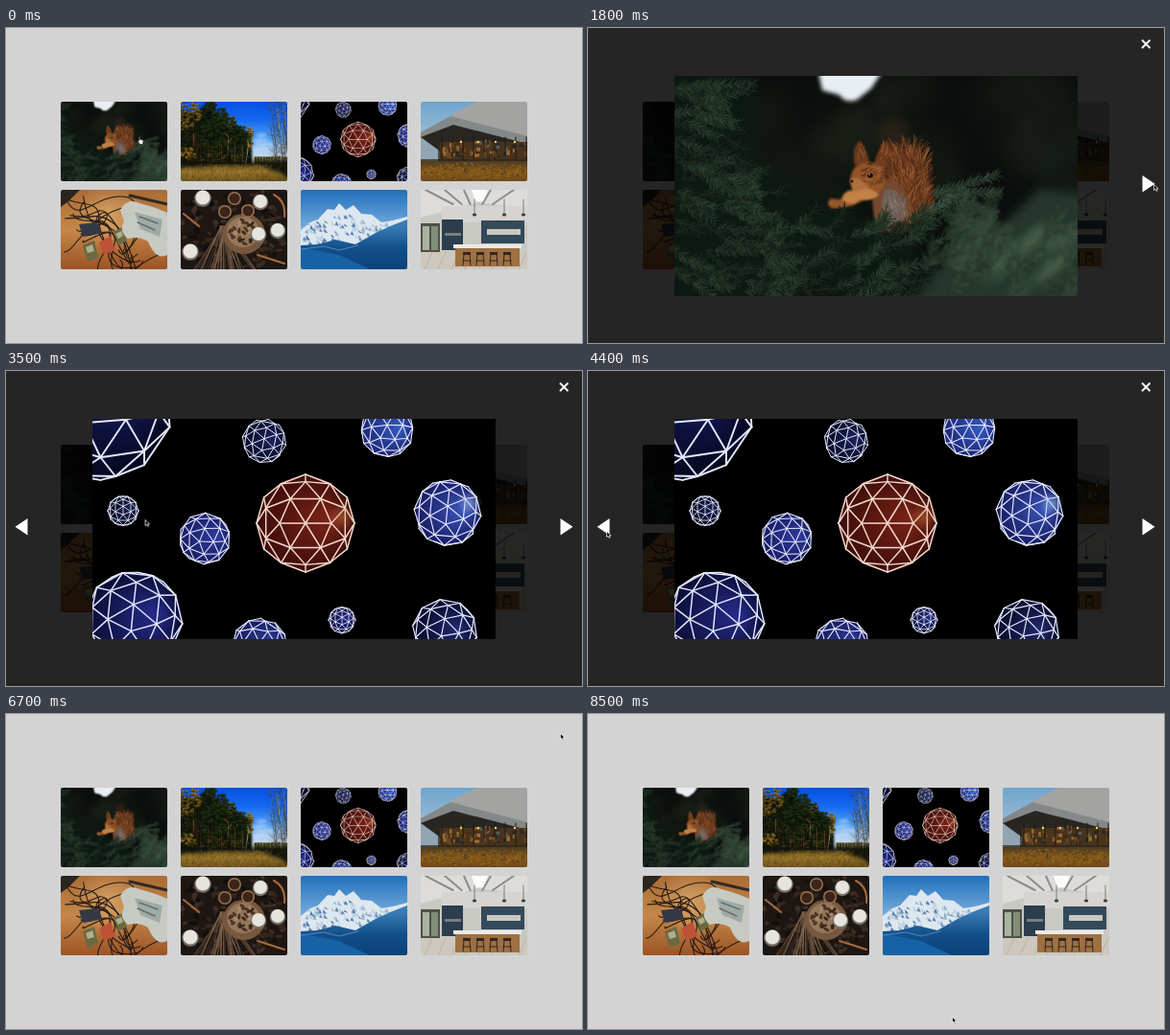
An HTML page with a canvas for the animation above (8.6 s loop, 600 px wide and 329 px high).

```html
<!DOCTYPE html>
<html lang="en">
<head>
<meta charset="utf-8">
<title>Gallery with lightbox</title>
<style>
  html, body { margin: 0; width: 100%; height: 100%; overflow: hidden; background: #d3d3d3; }
  #stage { position: relative; width: 600px; height: 329px; overflow: hidden; background: #d3d3d3; }
  #stage * { position: absolute; }
  #thumbs canvas { border-radius: 2px; }
  #box { inset: 0; background: rgba(0, 0, 0, .825); animation: box 8.6s linear infinite; }
  #box canvas { left: 90px; top: 49.5px; }
  #ui, #pointer { left: 0; top: 0; overflow: visible; }
  #two { animation: two 8.6s step-end infinite; }
  #three { animation: three 8.6s step-end infinite; }
  #prev { animation: prev 8.6s step-end infinite; }
  #pointer { animation: move 8.6s ease-in-out infinite; }
  #hand { animation: hand 8.6s step-end infinite; }
  #arrow { animation: arrow 8.6s step-end infinite; }

  @keyframes box { 0%, 3.49% { opacity: 0 } 6.4%, 74.42% { opacity: 1 } 77.33%, 100% { opacity: 0 } }
  @keyframes two { 0% { opacity: 0 } 21.51% { opacity: 1 } 31.98% { opacity: 0 } 52.33% { opacity: 1 } 61.05%, 100% { opacity: 0 } }
  @keyframes three { 0% { opacity: 0 } 31.98% { opacity: 1 } 52.33%, 100% { opacity: 0 } }
  @keyframes prev { 0% { opacity: 0 } 21.51% { opacity: 1 } 61.05%, 100% { opacity: 0 } }
  @keyframes hand { 0% { opacity: 1 } 4.65%, 100% { opacity: 0 } }
  @keyframes arrow { 0% { opacity: 0 } 4.65%, 100% { opacity: 1 } }
  @keyframes move {
    0%, 10.47% { transform: translate(137px, 113px) }
    18.6%, 34.88% { transform: translate(589px, 163px); animation-timing-function: ease-in }
    40.7% { transform: translate(145px, 155px); animation-timing-function: ease-out }
    44.77%, 61.28% { transform: translate(19px, 167px); animation-timing-function: ease-in }
    63.95% { transform: translate(515px, 36px); animation-timing-function: ease-out }
    67.44%, 79.07% { transform: translate(577px, 20px); animation-timing-function: ease-in }
    84.88% { transform: translate(500px, 110px); animation-timing-function: ease-out }
    93.6%, 100% { transform: translate(379px, 316px) }
  }
</style>
</head>
<body>
<div id="stage">
  <div id="thumbs"></div>
  <div id="box">
    <canvas id="one"></canvas>
    <canvas id="two"></canvas>
    <canvas id="three"></canvas>
    <svg id="ui" width="600" height="329" fill="#fff">
      <path d="M577 12.5l8.5 8.5m0-8.5l-8.5 8.5" stroke="#fff" stroke-width="1.9"/>
      <path d="M577.5 154l13 8.7-13 8.8z"/>
      <path id="prev" d="M22.5 154l-13 8.7 13 8.8z"/>
    </svg>
  </div>
  <svg id="pointer" width="10" height="12" stroke="#fff" stroke-width=".7">
    <path id="arrow" d="M.5.3v6.2l1.5-1.3 1 2.2 1.1-.5-1-2.1h1.9z" fill="#000"/>
    <path id="hand" d="M1.5.5q.8-.4 1 .6v2.2l2.9.8q.8.3.6 1.5l-.5 2.9h-3l-2.2-3.2q-.2-.9.7-.6l.5.4z" fill="#fff" stroke="#222"/>
  </svg>
</div>
<script>
let g, seed = 7;
const TAU = Math.PI * 2;

function rnd(a = 0, b = 1) {
  seed = (seed * 1664525 + 1013904223) >>> 0;
  return a + (b - a) * seed / 4294967296;
}
const pick = list => list[Math.floor(rnd() * list.length)];

function paint(canvas, w, h, draw) {
  canvas.width = w;
  canvas.height = h;
  g = canvas.getContext('2d');
  g.imageSmoothingQuality = 'high';
  g.lineCap = g.lineJoin = 'round';
  draw();
  return canvas;
}
function fill(color, d) {
  g.fillStyle = color;
  g.fill(new Path2D(d));
}
function stroke(color, width, d) {
  g.strokeStyle = color;
  g.lineWidth = width;
  g.stroke(new Path2D(d));
}
const line = (color, width, a, b, c, d) => stroke(color, width, `M${a} ${b}L${c} ${d}`);
function rect(color, x, y, w, h) {
  g.fillStyle = color;
  g.fillRect(x, y, w, h);
}
function oval(color, x, y, rx, ry = rx, turn = 0) {
  g.fillStyle = color;
  g.beginPath();
  g.ellipse(x, y, rx, ry, turn, 0, TAU);
  g.fill();
}
function blur(px, draw) {
  g.filter = `blur(${px}px)`;
  draw();
  g.filter = 'none';
}
function fade(y0, y1, ...colors) {
  const f = g.createLinearGradient(0, y0, 0, y1);
  colors.forEach((c, i) => f.addColorStop(i / (colors.length - 1), c));
  return f;
}
function glow(color, x, y, r) {
  const f = g.createRadialGradient(x, y, 0, x, y, r);
  f.addColorStop(0, color);
  f.addColorStop(1, color.slice(0, 7) + '00');
  oval(f, x, y, r);
}
// Calls draw at n random places inside an ellipse
function scatter(n, x, y, rx, ry, draw) {
  while (n--) {
    const a = rnd(0, TAU), r = Math.sqrt(rnd());
    draw(x + Math.cos(a) * r * rx, y + Math.sin(a) * r * ry);
  }
}
const leaves = (n, colors, x, y, rx, ry, size) => scatter(n, x, y, rx, ry, (px, py) =>
  oval(pick(colors), px, py, rnd(.5, 1) * size, rnd(.3, .7) * size, rnd(-1, 1)));
// Tufts of foliage with a shaded underside and a lit top
const tufts = (n, dark, lit, x, y, rx, ry, size = 6) => scatter(n, x, y, rx, ry, (px, py) => {
  leaves(12, dark, px, py + size * .35, size, size * .5, 1.8);
  leaves(11, lit, px, py - size * .2, size, size * .45, 1.4);
});
function sprig(x, y, angle, len, colors, needle = 8) {
  for (let t = 0; t < len; t += 1.3) {
    const px = x + Math.cos(angle) * t, py = y + Math.sin(angle) * t;
    for (const side of [-1, 1]) {
      const a = angle + side * rnd(.4, 1.1), l = needle * rnd(.6, 1.1);
      line(pick(colors), .7, px, py, px + Math.cos(a) * l, py + Math.sin(a) * l);
    }
  }
  line('#2d2a20', .8, x, y, x + Math.cos(angle) * len, y + Math.sin(angle) * len);
}
// Short hairs around one direction
const fur = (n, colors, x, y, rx, ry, angle, len) => scatter(n, x, y, rx, ry, (px, py) => {
  const a = angle + rnd(-.5, .5), l = len * rnd(.5, 1);
  line(pick(colors), .6, px, py, px + Math.cos(a) * l, py + Math.sin(a) * l);
});

function squirrel() {
  rect('#0b0e0c', 0, 0, 420, 230);
  for (let i = 0; i < 30; i++) glow(pick(['#1a231a80', '#1d231880', '#12171280']), rnd(70, 420), rnd(0, 140), rnd(20, 55));
  blur(2, () => fill('#e9eef3', 'M150-4H216L205 13 190 25Q178 29 172 20L154 15Z'));
  glow('#4a2c1c70', 228, 60, 24);
  blur(6, () => fill('#0e1812', 'M-10-10H75L90 90 160 140 250 160 260 240H-10Z'));
  const deep = ['#121e17', '#18281d', '#1f3025', '#0d1611'], lit = ['#263c2c', '#33493a', '#1c3023', '#15231a'];
  for (let i = 0; i < 120; i++) {
    const y = rnd(10, 235);
    sprig(rnd(-12, 25 + y * .4), y, rnd(-.3, .7), rnd(20, 42), i < 65 ? deep : lit);
  }
  sprig(0, 12, -.05, 82, lit);
  sprig(20, 32, -.3, 60, lit);

  const rust = ['#7a4220', '#94552c', '#57301b', '#a86738', '#3f2315'];
  blur(3, () => fill('#5a3019', 'M236 155Q208 104 222 72Q248 66 262 98Q277 130 266 149Z'));
  fur(420, rust, 250, 112, 15, 38, -1.1, 16);
  fur(240, rust, 238, 98, 14, 26, -1.9, 14);
  blur(.8, () => {
    fill('#74492f', 'M208 108Q236 105 246 132Q255 154 238 164H213Q203 140 208 108Z');
    fill('#6f6058', 'M219 118Q235 118 241 136Q238 156 224 160Q211 144 219 118Z');
    fill('#6d3b1e', 'M188 94Q184 74 193 69Q201 76 203 91ZM208 92Q212 74 222 68Q227 80 219 100Z');
    fill('#935428', 'M183 109Q184 92 201 90Q219 91 220 108Q218 123 203 127Q187 126 183 109Z');
    fill('#ad713f', 'M183 109Q190 103 198 112L207 121Q194 127 186 121Z');
    fill('#96572b', 'M206 124Q185 140 163 138Q157 132 163 128Q178 132 193 121Z');
    fill('#c28246', 'M174 129Q177 117 190 120Q205 115 213 124Q206 132 193 129Q185 138 174 129Z');
  });
  fur(110, rust, 205, 103, 13, 12, -.3, 5);
  fur(90, ['#85766d', '#5b4c45', '#7a5138', '#99887c'], 230, 137, 12, 20, 1.3, 7);
  fur(40, rust, 193, 80, 4, 9, -1.7, 6);
  fur(40, rust, 217, 81, 5, 10, -1.3, 6);
  oval('#170e09', 204, 104, 3, 2.6);
  oval('#fff', 203, 103, .7);
  oval('#2b1911', 185, 110, 1.6);

  for (let i = 0; i < 75; i++) sprig(rnd(80, 245), rnd(158, 240), rnd(-1, .3), rnd(18, 36), i < 40 ? deep : lit);
  for (let i = 0; i < 16; i++) sprig(rnd(235, 310), rnd(140, 180), rnd(-.9, .1), rnd(18, 36), lit);
  sprig(262, 142, -.5, 45, ['#405c47', '#2b4233', '#536c55']);
  for (const y of [104, 112, 122]) sprig(270, 122, (y - 112) / 30, 70, ['#30483a', '#3d5645', '#263a2c']);
  blur(5, () => {
    fill('#25372c', 'M245 240L290 185 340 158 380 118 430 125V240Z');
    for (let i = 0; i < 14; i++) oval(pick(['#3d5343', '#465c49', '#304538']), rnd(300, 420), rnd(160, 225), 22, 8, -.8);
  });
  blur(1.5, () => {
    for (let i = 0; i < 26; i++) sprig(rnd(260, 410), rnd(150, 240), rnd(-1.5, -.1), 32, ['#4a604e', '#3a5040', '#2a3c30'], 11);
  });
}

function forest() {
  rect(fade(0, 160, '#0650e4', '#166af0', '#4f9ff3', '#cfe2f2'), 0, 0, 420, 230);
  blur(4, () => {
    for (const [x, y, w] of [[290, 97, 16], [285, 112, 22], [298, 124, 30], [285, 138, 34]]) oval('#e3eefaa0', x, y, w, 4, -.1);
  });
  const shade = ['#0a1108', '#111a0b', '#1a230e'],
    pine = ['#223414', '#304319', '#3f4f1f', '#182610'],
    gold = ['#a87416', '#c08c24', '#8a6314', '#cf9f3a'],
    dusk = ['#4a3a10', '#6b4f14', '#2b260e'];
  blur(3, () => fill('#0d120a', 'M-9 20L100 30 125 10 170 40 205 65 232 78 258 90 264 185H-9Z'));
  tufts(120, dusk, gold, 50, 30, 64, 52);
  tufts(90, shade, pine.concat(dusk), 45, 108, 70, 48);
  for (let x = 4; x < 110; x += 8) line('#2e2917', .8, x, rnd(10, 60), x + rnd(-4, 4), 180);
  tufts(36, shade, gold.concat(pine), 203, 62, 13, 20, 5);
  tufts(34, dusk, gold, 256, 102, 9, 30, 4);
  tufts(100, shade, pine, 222, 118, 36, 54);
  tufts(130, shade, pine, 148, 92, 38, 82);
  tufts(34, shade, pine, 143, 12, 15, 14, 5);
  tufts(50, shade, pine, 176, 44, 18, 26);
  tufts(28, dusk, gold, 76, 153, 22, 20, 5);
  tufts(50, shade, ['#5a4a16', '#3a3a16', '#7a5a1a'], 165, 165, 95, 14, 5);
  for (let i = 0; i < 15; i++) line(pick(['#7d4526', '#4f301c', '#2a1d12']), 1.2, 92 + i * 11, rnd(110, 140), 92 + i * 11, 182);
  stroke('#a85c32', 1.4, 'M193 145V102L181 88M193 118L203 104M93 92L94 130M175 125V180');
  tufts(60, shade, pine, 172, 100, 60, 60, 5);
  stroke('#cfc8b0', 1.2, 'M242 180Q252 150 250 110M270 178L267 148');

  blur(1, () => rect('#2c3018', 268, 159, 162, 24));
  leaves(320, ['#5f5220', '#2a3018', '#8a6f2c', '#9c8640'], 345, 167, 80, 9, 1.8);
  for (let i = 0; i < 20; i++) {
    const x = 270 + i * 7.5;
    line('#c9c8b8', rnd(.4, 1), x, 178, x + rnd(-4, 4), rnd(122, 158));
  }
  // Birches: leaning trunks, fine twigs, sparse leaves
  const bark = ['#c4c3bb', '#4b4540', '#8a8680', '#2c2a2a'], twig = ['#3a302a', '#2b2a33', '#5a4a3c'];
  for (let i = 0; i < 30; i++) {
    const x = rnd(328, 428), top = rnd(0, 90), lean = rnd(8, 24);
    line(pick(bark), rnd(.6, 1.6), x, 192, x - lean, top);
    for (let j = 0; j < 26; j++) {
      const t = rnd(), bx = x - lean * t, by = 192 - (192 - top) * t, dx = rnd(-24, 20);
      line(pick(twig), .45, bx, by, bx + dx, by - rnd(4, 22));
    }
  }
  const dry = ['#4f3a28', '#2c2830', '#7d5f2c', '#1f2024', '#94742f'];
  leaves(1100, dry, 385, 72, 72, 90, 1.3);
  leaves(420, dry, 368, 14, 66, 26, 1.4);
  leaves(420, dry, 398, 135, 44, 50, 1.4);

  rect(fade(176, 230, '#5a4d1c', '#937028', '#6a521b'), 0, 180, 420, 50);
  blur(5, () => fill('#12130a', 'M-9 170H130L150 186 60 190 30 205-9 215ZM262 172H430V240H395L345 206 300 190ZM120 176H275V184H120Z'));
  const straw = ['#b88f3c', '#7b621f', '#463c16', '#96722a', '#c7a24f', '#30290f'];
  for (let y = 184; y < 238; y += .04) {
    const x = rnd(0, 420), dark = x > 270 + (238 - y) || x < 90 - (y - 184) * 2.5;
    line(pick(dark ? ['#2e2a10', '#4d4219', '#17170b', '#7a6226'] : straw), .6, x, y, x + rnd(-3, 3), y - rnd(2, 7));
  }
}

// Two-frequency icosahedral sphere: twelve corners plus the edge midpoints
const PHI = (1 + Math.sqrt(5)) / 2;
const unit = v => v.map(n => n / Math.hypot(...v));
const dist = (a, b) => Math.hypot(a[0] - b[0], a[1] - b[1], a[2] - b[2]);
function pairs(points, max) {
  const out = [];
  points.forEach((a, i) => points.slice(i + 1).forEach(b => dist(a, b) < max && out.push([a, b])));
  return out;
}
const corners = [];
for (const s of [-1, 1]) for (const t of [-PHI, PHI]) corners.push([0, s, t], [s, t, 0], [t, 0, s]);
const base = corners.map(unit);
const mids = pairs(base, 1.1).map(([a, b]) => unit(a.map((n, i) => n + b[i])));
const struts = pairs(base.concat(mids), .7);

function ball(x, y, r, dark, light, turn, tilt, edge = '#e4e8ff') {
  const f = g.createRadialGradient(x + r * .5, y - r * .1, 0, x, y, r);
  f.addColorStop(0, light);
  f.addColorStop(1, dark);
  oval(f, x, y, r * .96);
  const spin = ([a, b, c]) => {
    const p = a * Math.cos(turn) - b * Math.sin(turn), q = a * Math.sin(turn) + b * Math.cos(turn);
    return [x + r * p, y + r * (q * Math.cos(tilt) - c * Math.sin(tilt)), q * Math.sin(tilt) + c * Math.cos(tilt)];
  };
  for (const [a, b] of struts) {
    const p = spin(a), q = spin(b);
    if (p[2] + q[2] > -.15) line(edge, .6 + r / 60, p[0], p[1], q[0], q[1]);
  }
}
function spheres() {
  rect('#000', 0, 0, 420, 230);
  const navy = '#0a0c30', blue = '#252c8c';
  ball(4, -14, 80, '#05061a', '#151958', .3, .3);
  ball(179, 23, 23, '#080a20', '#1c2360', .2, .1);
  ball(307, 12, 28, '#1b2470', '#355cc4', .5, .2);
  ball(32, 96, 16, '#07081a', '#1b2050', 0, .3);
  ball(117, 125, 27, '#171b60', '#303aa0', .4, .4);
  ball(370, 98, 35, '#161a5e', '#3c57bd', .1, .2);
  glow('#a9c8f090', 393, 88, 13);
  ball(43, 209, 51, navy, blue, .1, .3);
  ball(174, 237, 29, '#151a58', '#3040a0', .6, .1);
  ball(260, 210, 14, navy, blue, 0, .2);
  ball(367, 222, 34, '#080a24', '#20286e', .2, .4);
  ball(222, 109, 51, '#3c0c08', '#7c2418', Math.PI / 2, 0, '#f6d9cd');
  glow('#d4804870', 260, 103, 15);
}

function pavilion() {
  rect(fade(0, 60, '#6fa5ce', '#b5c8d5'), 0, 0, 111, 83);
  fill('#464b43', 'M0 60L22 30H111V66H0Z');
  rect('#91a5b2', 0, 36, 18, 24);
  fill('#a3a4a2', 'M30 15L58 0H111V37Z');
  fill('#858888', 'M0 32L31 15 111 36V44L34 24 0 38Z');
  fill('#292622', 'M0 37L34 24 111 44V53H22Z');
  rect('#49331c', 20, 42, 91, 20);
  for (let i = 0; i < 60; i++) rect(pick(['#a06a2c', '#6b4720', '#2b2925', '#56605a']), rnd(22, 108), rnd(39, 57), rnd(1, 4), rnd(2, 6));
  for (let x = 22; x < 111; x += 11) line('#1e1a17', 1, x, 37, x, 63);
  rect('#33281b', 18, 60, 93, 3);
  rect(fade(62, 83, '#4c3c22', '#85581a', '#6d4a18'), 0, 62, 111, 21);
  leaves(200, ['#a06a1e', '#4a3a1e', '#85621e'], 55, 73, 60, 9, 1.3);
  for (const x of [42, 60, 78, 98]) oval('#ffd079', x, 42, 1.2);
}
function guitar() {
  rect(fade(0, 83, '#a96c35', '#c48749', '#9c5425'), 0, 0, 111, 83);
  glow('#dfae71b0', 50, 27, 35);
  fill('#2b241f', 'M0 0H20L8 12 0 18Z');
  for (let i = 0; i < 11; i++)
    stroke('#241a15', 1.1, `M${rnd(0, 30)} ${rnd(0, 75)}C${rnd(0, 50)} ${rnd(0, 80)} ${rnd(20, 75)} ${rnd(0, 30)} ${rnd(30, 80)} ${rnd(5, 80)}S${rnd(50, 90)} 85 ${rnd(60, 105)} ${rnd(62, 82)}`);
  fill('#343947', 'M19 36L38 34 43 45 23 49Z');
  fill('#676b43', 'M23 58L35 53 39 71 28 75ZM55 44L64 39 69 53 60 58Z');
  fill('#b2ad8b', 'M26 60L33 57 35 64 28 66ZM57 46L63 43 65 48 60 51Z');
  fill('#bd5236', 'M40 55L52 48 57 63 45 68Z');
  fill('#c6cac2', 'M62 21Q69 8 82 14Q98 18 111 24V68Q99 74 91 54Q81 48 70 51Q60 43 66 33Z');
  fill('#9eaaa7', 'M77 23L106 31 103 49 83 41Z');
  stroke('#312923', 3, 'M72 6L111 15');
  stroke('#696d6b', 1.5, 'M82 28L101 35M80 34L98 42');
}
function table() {
  rect('#1d1612', 0, 0, 111, 83);
  leaves(160, ['#34261d', '#110e0c', '#3d2e24'], 55, 40, 58, 45, 4);
  for (let i = 0; i < 42; i++) line(pick(['#80634c', '#5a412f', '#9a7c60']), .6, 45 + rnd(-4, 4), 38, rnd(13, 78), 83);
  oval('#76583e', 66, 46, 22, 21);
  oval('#95765a', 65, 44, 17, 16);
  leaves(40, ['#4b3425', '#a88b70', '#362518'], 65, 44, 14, 13, 3);
  for (const [x, y, r] of [[23, 8, 7.5], [83, 12, 7], [101, 42, 7], [81, 46, 7], [10, 64, 7.5]]) {
    oval('#73706a', x, y + 1, r + 1.3);
    oval('#e6e4dc', x, y, r);
  }
  for (const [x, y] of [[56, 9], [46, 23], [70, 22]]) {
    oval('#9e7453', x, y, 7);
    oval('#3b241a', x, y, 5.5);
  }
  stroke('#a96a3d', 2, 'M97 5Q110 12 108 28M3 25L19 38M80 68L108 77');
}
function mountain() {
  rect(fade(0, 40, '#216fba', '#75acdc'), 0, 0, 111, 83);
  fill('#dde7ef', 'M0 42L10 34 18 31 28 20 35 21 40 14 47 21 55 16 63 25 74 26 84 34 96 32 111 28V83H0Z');
  for (let i = 0; i < 110; i++) {
    const x = rnd(2, 94), y = 30 + Math.abs(x - 45) * .22 + rnd(-6, 20);
    fill(pick(['#8faecc', '#577da8', '#b9cee0']), `M${x} ${y}l${rnd(2, 5)} ${rnd(3, 6)}l-4-1Z`);
  }
  fill(fade(38, 83, '#397cb5', '#124f8b', '#0c4178'), 'M0 58L18 57 36 52 57 57 78 45 93 38 111 31V83H0Z');
  fill('#1762a4', 'M0 60L40 68 72 83H0Z');
  stroke('#6fa3cd', .7, 'M1 62L24 59 40 63 60 58');
}
function kitchen() {
  rect('#c9c9c4', 0, 0, 111, 83);
  fill('#dedcd8', 'M0 0H111V20L60 13 0 29Z');
  for (const x of [5, 25, 45, 73, 97]) line('#8d8c87', 2, x, 0, 57 + (x - 57) * .45, 15);
  fill('#f9fbfc', 'M53 0H70L65 12H57Z');
  rect('#d6d4d0', 22, 17, 89, 17);
  rect('#504f4a', 0, 35, 20, 31);
  rect('#a9b3a0', 2, 38, 7, 25);
  rect('#7f8f77', 11, 38, 7, 25);
  rect('#2c3d4d', 22, 31, 22, 32);
  rect('#777f82', 25, 45, 17, 3);
  rect('#34495a', 63, 32, 45, 24);
  rect('#c9c8bf', 69, 41, 35, 6);
  rect('#cdc7bd', 0, 65, 111, 18);
  for (let x = -10; x < 111; x += 14) line('#b0a79b', .6, x + 8, 65, x, 83);
  rect('#9e7042', 36, 61, 67, 19);
  rect('#eceae5', 34, 57, 71, 4);
  for (let x = 48; x < 100; x += 14) {
    rect('#332720', x - 4, 65, 8, 3);
    stroke('#332720', 1, `M${x - 3} 67L${x - 4} 79M${x + 3} 67L${x + 4} 79M${x - 4} 74H${x + 4}`);
  }
  for (const x of [56, 87, 107]) {
    line('#403e3b', .6, x, 10, x, 25);
    oval('#383a3b', x, 26, 2.2, 1.6);
  }
}

const large = [['one', squirrel], ['two', forest], ['three', spheres]]
  .map(([id, draw]) => paint(document.getElementById(id), 420, 230, draw));
const crop = img => () => g.drawImage(img, 56, 0, 308, 230, 0, 0, 111, 83);

[...large.map(crop), pavilion, guitar, table, mountain, kitchen].forEach((draw, i) => {
  const c = paint(document.createElement('canvas'), 111, 83, draw);
  c.style.left = 57 + (i % 4) * 125 + 'px';
  c.style.top = (i < 4 ? 77 : 169) + 'px';
  document.getElementById('thumbs').append(c);
});
</script>
</body>
</html>
```
